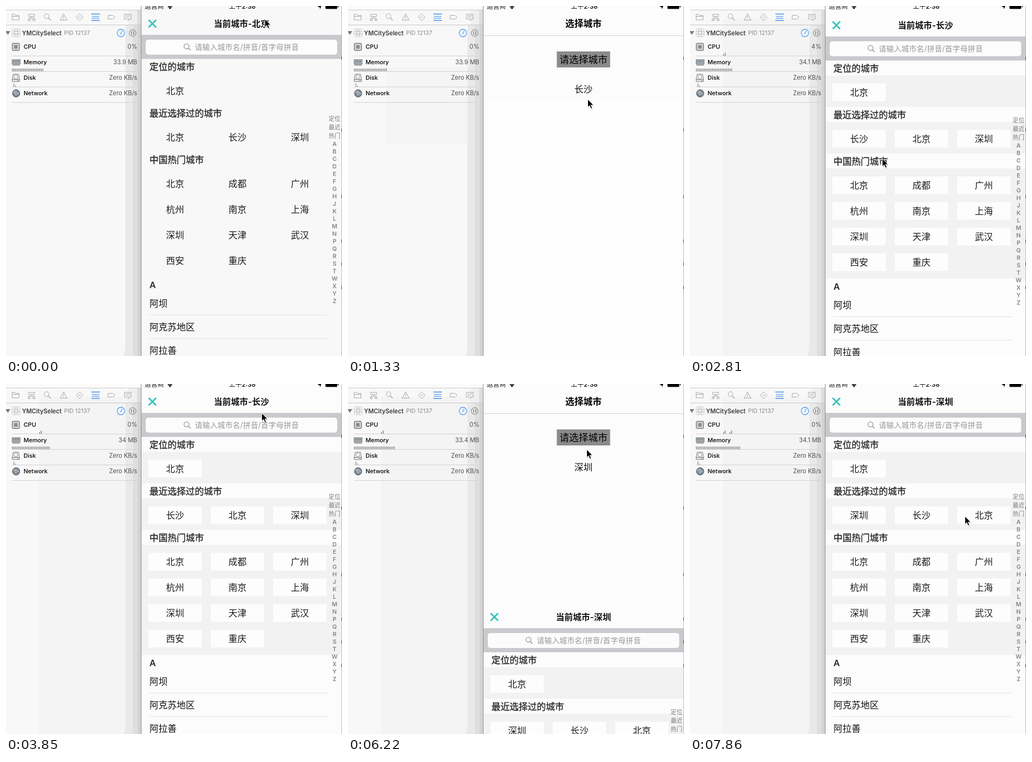
These frames come from a looping animation (630 by 655 pixels, 8 s). An HTML page:

```html
<!DOCTYPE html>
<html lang="zh-CN">
<head>
<meta charset="utf-8">
<style>
html, body { margin: 0; width: 100%; height: 100%; overflow: hidden; background: #f8f8f8; }
svg { display: block; font-family: Inter, "Noto Sans CJK SC", "Noto Sans CJK", sans-serif; }
</style>
</head>
<body>
<svg id="stage" width="630" height="655" viewBox="0 0 630 655"></svg>
<script>
const LOOP = 8000, STEP = LOOP / 54, SLIDE = 667;
const stage = document.getElementById('stage');

const rect = (x, y, w, h, fill, more = '') =>
  `<rect x="${x}" y="${y}" width="${w}" height="${h}" fill="${fill}" ${more}/>`;
const path = (d, stroke, width = 1, fill = 'none') =>
  `<path d="${d}" stroke="${stroke}" stroke-width="${width}" fill="${fill}"/>`;
const disc = (x, y, r, stroke, fill = 'none', width = 1) =>
  `<circle cx="${x}" cy="${y}" r="${r}" stroke="${stroke}" stroke-width="${width}" fill="${fill}"/>`;
// y is the middle of the line of text
const text = (x, y, s, size, fill, anchor = 'start', weight = 400, more = '') =>
  `<text x="${x}" y="${y + size * .37}" font-size="${size}" fill="${fill}" text-anchor="${anchor}" font-weight="${weight}" ${more}>${s}</text>`;

// Times at which the city sheet starts to move
const slides = [[985, 'down'], [2380, 'up'], [5138, 'down'], [6182, 'up']];

function sheetOffset(t) {
  const last = slides.filter(s => s[0] <= t).pop();
  if (!last) return 0;
  const rest = SLIDE * Math.exp(-(t - last[0]) / 80);
  const y = last[1] === 'up' ? rest : SLIDE - rest;
  return Math.round(y);
}

// time, x, y of the pointer tip
const track = [
  [0, 485, 24], [100, 485, 24], [740, 432, 239], [920, 432, 239], [1333, 449, 174],
  [1770, 451, 109], [2378, 451, 109], [2815, 360, 285], [3260, 405, 240], [3450, 405, 240],
  [3852, 479, 54], [4150, 474, 28], [4350, 474, 28], [4890, 540, 250], [5040, 540, 250],
  [5185, 460, 193], [5770, 451, 109], [6100, 451, 109], [6518, 436, 154], [6960, 343, 239],
  [7120, 343, 239], [7410, 436, 247], [7570, 436, 247], [7850, 515, 247], [8000, 515, 247]
];

function pointer(t) {
  const i = Math.max(1, track.findIndex(k => k[0] >= t));
  const [t0, x0, y0] = track[i - 1], [t1, x1, y1] = track[i];
  const p = (t - t0) / (t1 - t0);
  const x = Math.round(x0 + (x1 - x0) * p), y = Math.round(y0 + (y1 - y0) * p);
  const d = 'M.5 .5V15.5L4 12.3 6.4 18 9 17 6.6 11.4H11.3Z';
  return `<g transform="translate(${x + 1} ${y + 2})" opacity=".2">${path(d, 'none', 0, '#000')}</g>
    <g transform="translate(${x} ${y})">${path(d, '#fff', 1, '#000')}</g>`;
}

function toolbar() {
  const c = '#a6a6a6', b = '#6fa8ee';
  return rect(0, 0, 253, 7, '#fbfbfb') + rect(0, 7, 253, 1, '#cbcbcb') + rect(0, 35, 253, 1, '#c6c6c6') +
    path('M11.5 26V15.5H16L17.5 17.5H24.5V26ZM11.5 19.5H24.5', c) +
    path('M42.5 15.5H53.5V19.5H42.5ZM48 19.5V22.5M43.5 25V22.5H52.5V25M41.5 24.5H45.5V27.5H41.5ZM50.5 24.5H54.5V27.5H50.5Z', c) +
    disc(76, 19, 4.5, c) + path('M79.3 22.3L84 27', c, 1.4) +
    path('M108 14.5L114.5 26.5H101.5ZM108 18.5V23M108 24V25.2', c) +
    path('M138 14.5L144.5 21 138 27.5 131.5 21ZM135.5 21H140.5', c) +
    path('M160 15H176M160 27H176', b, 2) + path('M161 19.5H175M161 23H175', b, 1.4) +
    path('M191.5 17.5H200.5L204.5 21 200.5 24.5H191.5Z', c) +
    path('M222 15.5H234.5V24.5H230V27.5L226.5 24.5H222ZM224.5 18.5H232M224.5 21.5H230', c);
}

function rowIcons() {
  const c = '#777';
  return rect(11.5, 69.5, 14, 14, '#bbb', `rx="2" stroke="${c}"`) + rect(14.5, 72.5, 8, 8, '#8d8d8d', 'stroke="#eee"') +
    rect(11.5, 100.5, 15, 8, '#a9b3ba', `stroke="${c}"`) +
    path('M14.5 102V106M17.5 102V106M20.5 102V106M23.5 102V106', '#5f6a72') + path('M12 110.5H26', c, 1.5) +
    path('M13.5 127.5H23.5L25.5 137V141.5H11.5V137Z', '#888', 1, '#e4e4e4') +
    disc(18.5, 132.5, 3.5, '#999', '#fafafa') + path('M12 137.5H25M21 139.5H24', '#777') +
    disc(19, 163.5, 7, '#5d6670', '#77828d') +
    path('M14 161L19 159 24 164 18 167ZM19 159L18 167M14 161L24 164', '#d5dbe0', .8);
}

function sidebar(t) {
  const ticks = Math.floor((t + 350) / 1000);
  const cpu = ['0%', '0%', '0%', '4%', '0%', '0%', '0%', '5%', '0%'][ticks];
  const memory = ['33.9', '33.9', '33.9', '34.1', '34', '34', '33.4', '34.1', '34.1'][ticks] + ' MB';
  let s = rect(0, 0, 253, 655, '#f8f8f8');
  if (t > 2500) s += rect(62, 24, 191, 631, '#f4f4f4');
  else if (t > 700) s += rect(71, 115, 182, 144, '#f5f5f5');
  s += path('M224 36V630Q224 650 220 655H253V36Z', 'none', 0, '#e9e9e9') +
    rect(238, 36, 15, 619, '#dedede') + rect(247, 36, 6, 619, '#d2d2d2') +
    rect(230, 8, 23, 27, '#efefef') + rect(246, 8, 7, 27, '#dcdcdc') + toolbar() +
    path('M-1 47H8L3.5 54Z', 'none', 0, '#7a7a7a') +
    rect(11.5, 42.5, 15, 15, '#f3f3f3', 'rx="3" stroke="#bbb" stroke-dasharray="2 1"') +
    path('M12 47.5H27M12 52.5H27M16.5 43V57M21.5 43V57', '#c9c9c9', 1) + disc(19, 50, 4, '#c9c9c9') +
    text(30, 50.5, 'YMCitySelect', 11.2, '#3c3c3c', 'start', 600) + text(109, 50.5, 'PID 12137', 10.8, '#8a8a8a') +
    disc(215.5, 50.5, 7, '#5a9cec', '#eef5fd', 1.3) + path('M214.5 53L218 46.5', '#5a9cec', 1.3) +
    disc(237.5, 50.5, 6.3, '#777') + path('M235.5 47V54M239.5 47V54', '#777', 1.3) + rowIcons();
  [['CPU', cpu], ['Memory', memory], ['Disk', 'Zero KB/s'], ['Network', 'Zero KB/s']].forEach(([name, value], i) => {
    const y = 76 + 29 * i;
    s += text(33, y, name, 11, '#000', 'start', 500) + text(246, y, value, 11.3, '#505050', 'end') +
      rect(11, y + 17, i % 2 ? 234 : 227, 1, '#d0d0d0');
  });
  for (let i = 0; i < 20 + ticks; i++) s += rect(11 + 3 * i, 117, 2, 5, '#a3a3a3');
  const peak = x => rect(x, 90, 2, 3, '#a0a0a0') + rect(x + 3, 87, 2, 6, '#a0a0a0');
  if (ticks >= 3) s += peak(62);
  if (ticks >= 7) s += peak(74);
  return s + rect(14, 145, 1.5, 6, '#999') + rect(17, 149, 2, 2, '#aaa');
}

function home(city, t) {
  const low = t < 2500 ? '#fefefe' : '#fcfcfc';
  return rect(254, 0, 376, 655, low) + rect(254, 0, 376, 174, '#fcfcfc') +
    text(441.5, 33, '选择城市', 17, '#000', 'middle', 600) + rect(254, 55, 376, 1, '#d0d0d0') +
    rect(391.5, 85, 100, 30, '#8b8b8b') + text(441.5, 100, '请选择城市', 18, '#000', 'middle') +
    text(441.5, 156, city, 17, '#111', 'middle');
}

const hot = '北京 成都 广州 杭州 南京 上海 深圳 天津 武汉 西安 重庆'.split(' ');

function sheet(recent, t) {
  const plain = t < 1000;
  const bg = plain ? '#f8f8f8' : '#fcfcfc';
  let s = rect(254, -8, 376, 675, bg);
  const cells = (names, y) => names.forEach((name, i) => {
    const x = 267 + 117 * (i % 3), top = y + 48 * Math.floor(i / 3);
    if (!plain) s += rect(x, top, 100, 33, '#fdfdfd');
    s += text(x + 50, top + 16.5, name, 17, '#1c1c1c', 'middle');
  });
  const section = (y, title, height, names) => {
    if (!plain) s += rect(254, y + 28, 376, height, '#f2f2f2');
    s += text(269, y + 14.5, title, 17, '#2a2a2a', 'start', 500, 'stroke="#2a2a2a" stroke-width=".35"');
    cells(names, y + 43);
  };
  section(99, '定位的城市', 59, ['北京']);
  section(186, '最近选择过的城市', 59, recent);
  section(273, '中国热门城市', 206, hot);
  s += text(269, 522, 'A', 16.5, '#2a2a2a', 'start', 600);
  ['阿坝', '阿克苏地区', '阿拉善'].forEach((name, i) => {
    s += text(269, 557 + 44 * i, name, 17, '#111') + rect(269, 578 + 44 * i, 334, 1, '#e2e2e4');
  });
  ['定位', '最近', '热门'].forEach((name, i) => s += text(616, 211 + 16.2 * i, name, 11, '#7c7c7c', 'middle'));
  [...'ABCDEFGHJKLMNPQRSTWXYZ'].forEach((c, i) => s += text(616, 258 + 14 * i, c, 11, '#858585', 'middle', 600));
  return s + text(441.5, 33, '当前城市-' + recent[0], 16, '#111', 'middle', 600) +
    path('M267.5 26L281.5 40M281.5 26L267.5 40', '#35c4bb', 3) +
    rect(254, 54, 376, 45, '#c9c9ce') + rect(262, 63, 359, 28, '#fcfcfc', 'rx="5"') +
    disc(338.5, 75.5, 4.7, '#8e8e93', 'none', 1.2) + path('M342 79L346 83', '#8e8e93', 1.4) +
    text(354, 77, '请输入城市名/拼音/首字母拼音', 14, '#98989d', 'start', 400, 'letter-spacing=".2"');
}

function statusBar() {
  let s = text(260, 1, '运营商', 12, '#111') + text(443, 1, '上午2:38', 12, '#000', 'middle', 500) +
    path('M303 1.5Q307.5 -2.5 312 1.5L307.5 6Z', 'none', 0, '#111') + path('M304 2.8Q307.5 0 311 2.8', '#fafafa', .8) +
    path('M584 1.5L592 -3 589 6 588 2Z', 'none', 0, '#000') +
    rect(599, -4, 22, 9.5, '#000', 'rx="1.5"') + rect(622, -1, 1.5, 3.5, '#000');
  s += rect(253, 0, 1, 655, '#8c8c8c') + rect(629, 0, 1, 655, '#b5b5b5');
  [98, 232, 357, 440, 483, 527].forEach(y => s += rect(629, y - 3, 1, 6, '#333'));
  return s;
}

function scene(t) {
  const recent = t < 1000 ? ['北京', '长沙', '深圳'] : t < 5150 ? ['长沙', '北京', '深圳'] : ['深圳', '长沙', '北京'];
  const y = sheetOffset(t);
  return sidebar(t) + home(recent[0], t) +
    (y < 655 ? `<g transform="translate(0 ${y})">${sheet(recent, t)}</g>` : '') +
    statusBar() + pointer(t);
}

let shown = -1;
function tick() {
  const n = Math.min(53, Math.floor((performance.now() % LOOP + 12) / STEP));
  if (n !== shown) stage.innerHTML = scene((shown = n) * STEP);
  requestAnimationFrame(tick);
}
tick();
</script>
</body>
</html>
```
